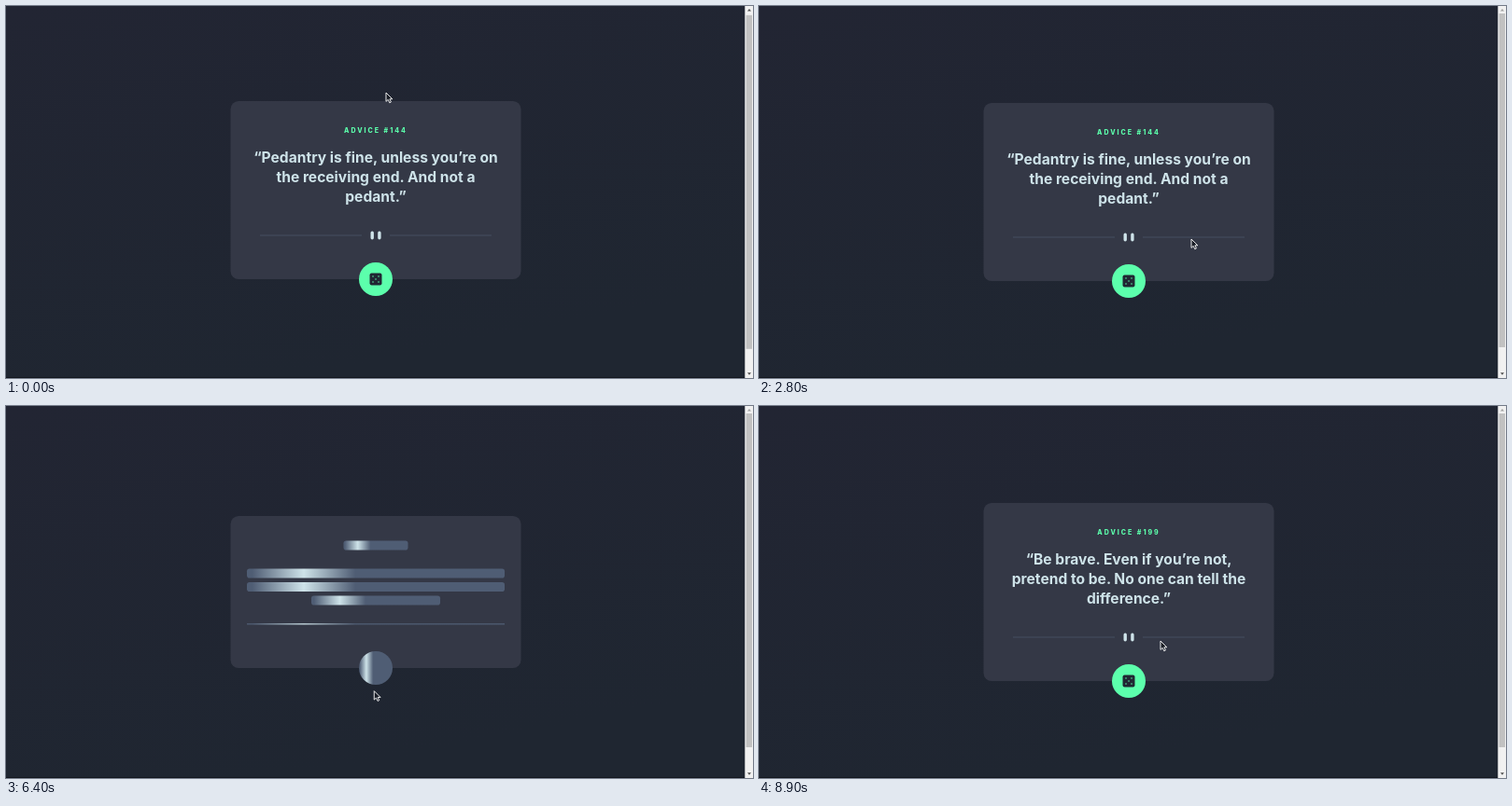
An HTML page that plays this animation: 800 by 399 pixels, repeating every 9000 ms.

```html
<!DOCTYPE html>
<html lang="en">
<head>
<meta charset="utf-8">
<title>Advice generator</title>
<style>
  html, body { margin: 0; width: 100%; height: 100%; overflow: hidden; background: #202632; }
  svg { display: block; width: 100vw; height: 100vh; }
  text { font-family: Inter, "Open Sans", sans-serif; font-weight: 700; text-anchor: middle; white-space: pre; }
  .title { font-size: 7px; font-weight: 800; letter-spacing: 2px; }
  .quote { font-size: 15.6px; }
  .credit { font-size: 6.3px; font-weight: 600; fill: #e6eef2; }
  .credit .green { font-weight: 700; }
  .green { fill: #5cffac; }
  .light { fill: #cee3e9; }
  .dark { fill: #202733; }
  .card { fill: #343846; }
</style>
</head>
<body>
<svg viewBox="0 0 800 399" preserveAspectRatio="none">
  <defs>
    <linearGradient id="night" x2=".4" y2="1">
      <stop stop-color="#222533"/>
      <stop offset="1" stop-color="#1f2631"/>
    </linearGradient>
    <linearGradient id="shimmer">
      <stop stop-color="#4f5d74"/>
      <stop offset=".5" stop-color="#cee3e9"/>
      <stop offset="1" stop-color="#4f5d74"/>
    </linearGradient>
  </defs>
  <rect width="800" height="399" fill="url(#night)"/>

  <g id="page">
    <g id="advice">
      <rect class="card" x="240.5" y="104" width="311" height="191" rx="8.6"/>
      <text id="title" class="title green" x="396" y="138.3"></text>
      <text class="light quote" x="396" y="170"></text>
      <text class="light quote" x="396" y="191.2"></text>
      <text class="light quote" x="396" y="212.4"></text>
      <path d="M272 248H381M411 248H520" stroke="#4a5467" stroke-width=".8"/>
      <path d="M392.2 245.2V250.8M399.9 245.2V250.8" stroke="#cee3e9" stroke-width="3.4" stroke-linecap="round"/>
      <circle class="green" cx="396" cy="295" r="18"/>
      <rect class="dark" x="389.5" y="288.5" width="13" height="13" rx="2"/>
      <path d="M393 292h0M399 292h0M396 295h0M393 298h0M399 298h0"
        stroke="#5cffac" stroke-width="1.5" stroke-linecap="round"/>
    </g>
    <g id="skeleton" fill="url(#shimmer)">
      <rect class="card" x="240.5" y="118" width="311" height="163" rx="8.6"/>
      <rect x="361.5" y="144.5" width="69" height="10" rx="2.8"/>
      <rect x="258" y="174.5" width="276" height="10" rx="2.8"/>
      <rect x="258" y="189" width="276" height="10" rx="2.8"/>
      <rect x="327" y="203.5" width="138" height="10" rx="2.8"/>
      <rect x="258" y="233.2" width="276" height="1.3"/>
      <circle cx="396" cy="281" r="18"/>
    </g>
    <text class="credit" x="396" y="414.6">Challenge by <tspan class="green">Orchard Lantern</tspan>. Coded by <tspan class="green">Ernesto Noé Lucas.</tspan></text>
  </g>

  <rect y="398" width="792" height="1" fill="#12161e"/>
  <rect x="791.3" width="8.7" height="399" fill="#f1f1f1"/>
  <rect id="thumb" x="792.6" width="6.4" height="358" fill="#c1c1c1"/>
  <path id="up" d="M794 5.5h4l-2-2.5z"/>
  <path id="down" d="M794 393.2h4l-2 2.5z"/>

  <path id="arrow" d="M0 0V9.4L2.2 7.4L3.8 10.8L5.4 10L3.9 6.8H6.8Z" fill="#181c25" stroke="#fff" stroke-width=".9" stroke-linejoin="round"/>
  <path id="hand" d="M-1 .9Q0 -.6 1 .9V4L4 4.8Q5 5.2 4.8 6.5L4 10.5H-1L-3.6 6.6Q-3.6 5.2 -2.4 5.6L-1 6.6Z" fill="#fff" stroke="#262b36" stroke-width=".5"/>
</svg>
<script>
const LOOP = 9000, STEP = 100, MAX_SCROLL = 27, MOVE_TIME = 600;
const LOAD_START = 5300, LOAD_END = 7000;
const ADVICE = [
  ["ADVICE #144", "“Pedantry is fine, unless you’re on", "the receiving end. And not a", "pedant.”"],
  ["ADVICE #199", "“Be brave. Even if you’re not,", "pretend to be. No one can tell the", "difference.”"]
];

// Places the pointer reaches: arrival in ms, x, y.
const STOPS = [
  [0, 407, 93], [900, 372, 387], [1700, 249, 378], [2100, 417, 361], [2800, 463, 250],
  [3900, 271, 349], [4500, 396, 312], [5100, 397.5, 297.5], [6800, 385, 329],
  [7200, 405, 330], [8300, 500, 187], [8700, 377, 338], [8900, 430, 252]
];

const $ = id => document.getElementById(id);
const set = (id, attrs) => { for (const k in attrs) $(id).setAttribute(k, attrs[k]); };
const show = (id, visible) => set(id, { visibility: visible ? "visible" : "hidden" });
const mix = (a, b, u) => a + (b - a) * u;

function ease(t, from, to) {
  const u = Math.min(1, Math.max(0, (t - from) / (to - from)));
  return u * u * (3 - 2 * u);
}

// The pointer rests at each stop until the next move has to begin.
function pointerAt(t) {
  const next = Math.max(1, STOPS.findIndex(stop => stop[0] >= t));
  const [[left, x0, y0], [arrival, x1, y1]] = STOPS.slice(next - 1, next + 1);
  const u = ease(t, Math.max(left, arrival - MOVE_TIME), arrival);
  return [mix(x0, x1, u), mix(y0, y1, u)];
}

function scrollAt(t) {
  return t < 2300 ? mix(2, MAX_SCROLL, ease(t, 0, 800)) : MAX_SCROLL * (1 - ease(t, 2300, 2800));
}

function draw(t) {
  const scroll = scrollAt(t);
  const [x, y] = pointerAt(t);
  const loading = t >= LOAD_START && t < LOAD_END;
  const pointing = t >= 4500 && t < 6300;
  const peak = Math.max(0, t - 6100) / 1360;

  const [title, ...lines] = ADVICE[t < LOAD_END ? 0 : 1];
  $("title").textContent = title;
  document.querySelectorAll(".quote").forEach((el, i) => el.textContent = lines[i]);
  show("advice", !loading);
  show("skeleton", loading);
  set("shimmer", { x1: peak - .2, x2: peak + .2 });

  set("page", { transform: `translate(0 ${-scroll})` });
  set("thumb", { y: 8 + scroll * .9 });
  set("up", { fill: scroll > 0 ? "#505050" : "#a3a3a3" });
  set("down", { fill: scroll < MAX_SCROLL ? "#505050" : "#a3a3a3" });

  for (const id of ["arrow", "hand"]) set(id, { transform: `translate(${x} ${y})` });
  show("arrow", !pointing);
  show("hand", pointing);
}

function tick() {
  draw(Math.floor(performance.now() % LOOP / STEP) * STEP);
  requestAnimationFrame(tick);
}
tick();
</script>
</body>
</html>
```
